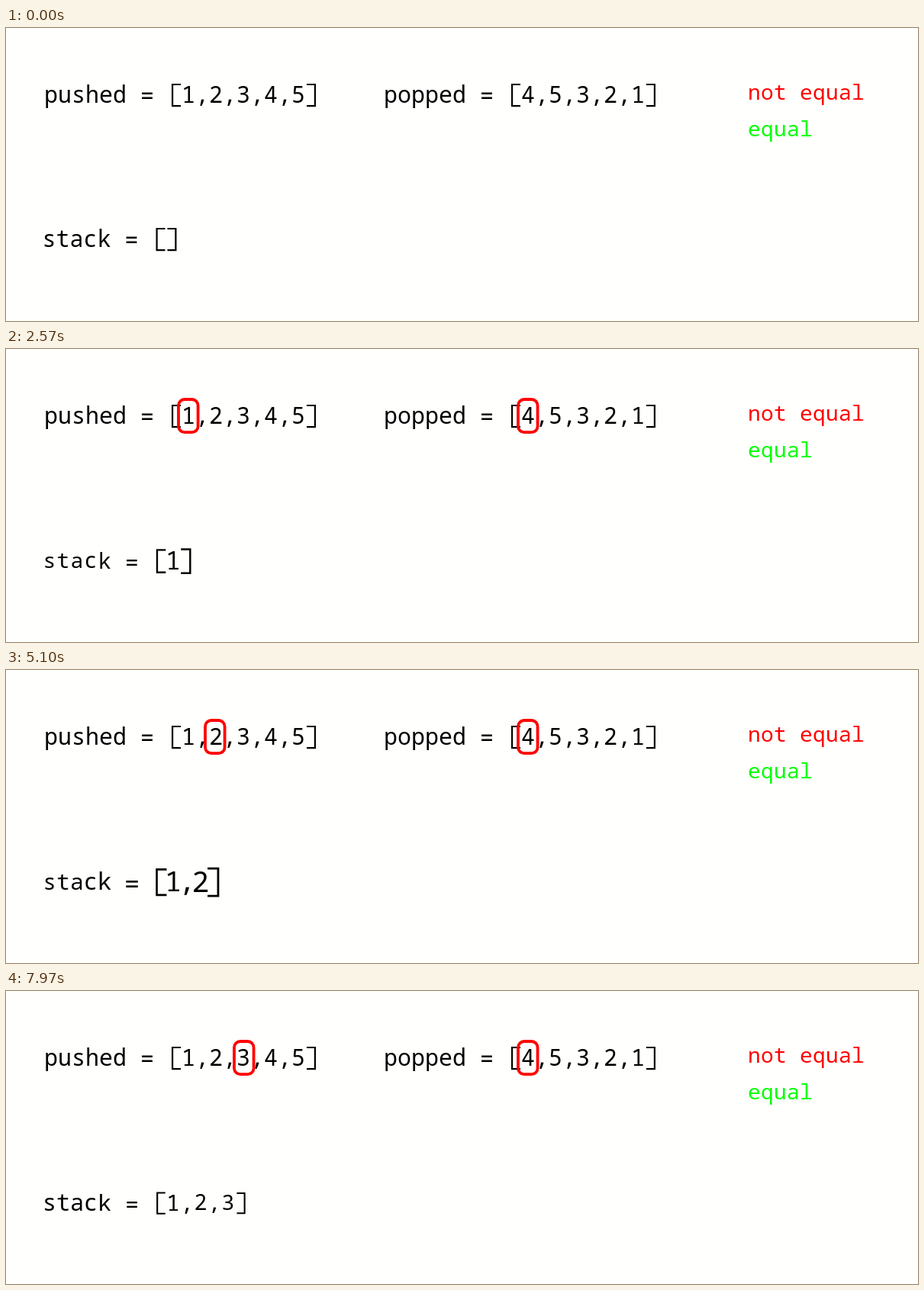
These frames come from a looping animation (1195x384 px, 8000 ms). An HTML page with a canvas:

```html
<!DOCTYPE html>
<html lang="en">
<head>
<meta charset="utf-8">
<title>Stack sequence</title>
<style>
  html, body { margin: 0; width: 100%; height: 100%; overflow: hidden; background: #fffffd; }
  canvas { display: block; }
</style>
</head>
<body>
<canvas id="stage" width="1195" height="384"></canvas>
<script>
const ctx = document.getElementById('stage').getContext('2d');
const LOOP = 8000;
const FONT = '"Noto Sans Mono", "DejaVu Sans Mono", monospace';
const LETTER_LAG = 26;

const pops = [
  { start: 1800, text: 'stack = [1]' },
  { start: 4440, text: 'stack = [1,2]' },
  { start: 6870, text: 'stack = [1,2,3]' }
];
const moves = [
  { start: 2960, from: 226, to: 261 },
  { start: 5390, from: 261, to: 299 }
];

const clamp = v => Math.max(0, Math.min(1, v));
const easeInOut = u => (1 - Math.cos(Math.PI * clamp(u))) / 2;
const spring = t => t <= 0 ? 0 : 1 - Math.exp(-0.0035 * t) * Math.cos(Math.PI * t / 400);

// Wide, thin brackets; dir is 1 for an opening one and -1 for a closing one.
function drawBracket(dir) {
  const spine = dir > 0 ? -2.9 : 3.9;
  const tip = spine + 10.9 * dir;
  ctx.lineWidth = 2.2;
  ctx.beginPath();
  ctx.moveTo(tip, -14);
  ctx.lineTo(spine, -14);
  ctx.lineTo(spine, 14.2);
  ctx.lineTo(tip, 14.2);
  ctx.stroke();
}

function drawGlyph(ch, size) {
  if (ch === '[') drawBracket(1);
  else if (ch === ']') drawBracket(-1);
  else ctx.fillText(ch, 0, size / 3 + (ch === '=' ? 2.2 : 0));
}

function drawText(text, x, baseline, { size = 30, pitch = 18, color = '#000', scale = () => 1 } = {}) {
  ctx.fillStyle = ctx.strokeStyle = color;
  ctx.font = `${size}px ${FONT}`;
  ctx.textAlign = 'center';
  [...text].forEach((ch, i) => {
    const s = scale(i);
    if (ch === ' ' || s <= 0) return;
    ctx.save();
    ctx.translate(x + (i + 0.5) * pitch, baseline - size / 3);
    ctx.scale(s, s);
    drawGlyph(ch, size);
    ctx.restore();
  });
}

function drawMarker(x, y) {
  ctx.beginPath();
  ctx.roundRect(x, y, 25.6, 43.2, 8);
  ctx.stroke();
}

function drawMarkers(t) {
  if (t < 500) return;
  const u = clamp((t - 500) / 770);
  const drift = u < 1 ? Math.exp(-5.5 * u) * Math.cos(5 * u) : 0;
  let x = moves[0].from;
  for (const m of moves) {
    if (t >= m.start) x = m.from + (m.to - m.from) * easeInOut((t - m.start) / 1000);
  }
  ctx.save();
  ctx.globalAlpha = clamp(u * 4);
  ctx.strokeStyle = '#f00';
  ctx.lineWidth = 3.8;
  drawMarker(x + 8 * drift, 66 + 41 * drift);
  drawMarker(671 + 8 * drift, 66 + 41 * drift);
  ctx.restore();
}

function drawStack(t) {
  const pop = pops.filter(p => t >= p.start).pop();
  if (!pop) return drawText('stack = []', 47.5, 287);
  drawText(pop.text, 48, 288, { scale: i => spring(t - pop.start - i * LETTER_LAG) });
}

function draw(t) {
  ctx.fillStyle = '#fffffd';
  ctx.fillRect(0, 0, 1195, 384);
  drawText('pushed = [1,2,3,4,5]', 50, 98);
  drawText('popped = [4,5,3,2,1]', 495, 98);
  drawText('not equal', 972, 94, { size: 28, pitch: 17, color: '#f00' });
  drawText('equal', 972, 142, { size: 28, pitch: 17, color: '#0f0' });
  drawStack(t);
  drawMarkers(t);
}

function tick() {
  draw(performance.now() % LOOP);
  requestAnimationFrame(tick);
}
tick();
</script>
</body>
</html>
```
